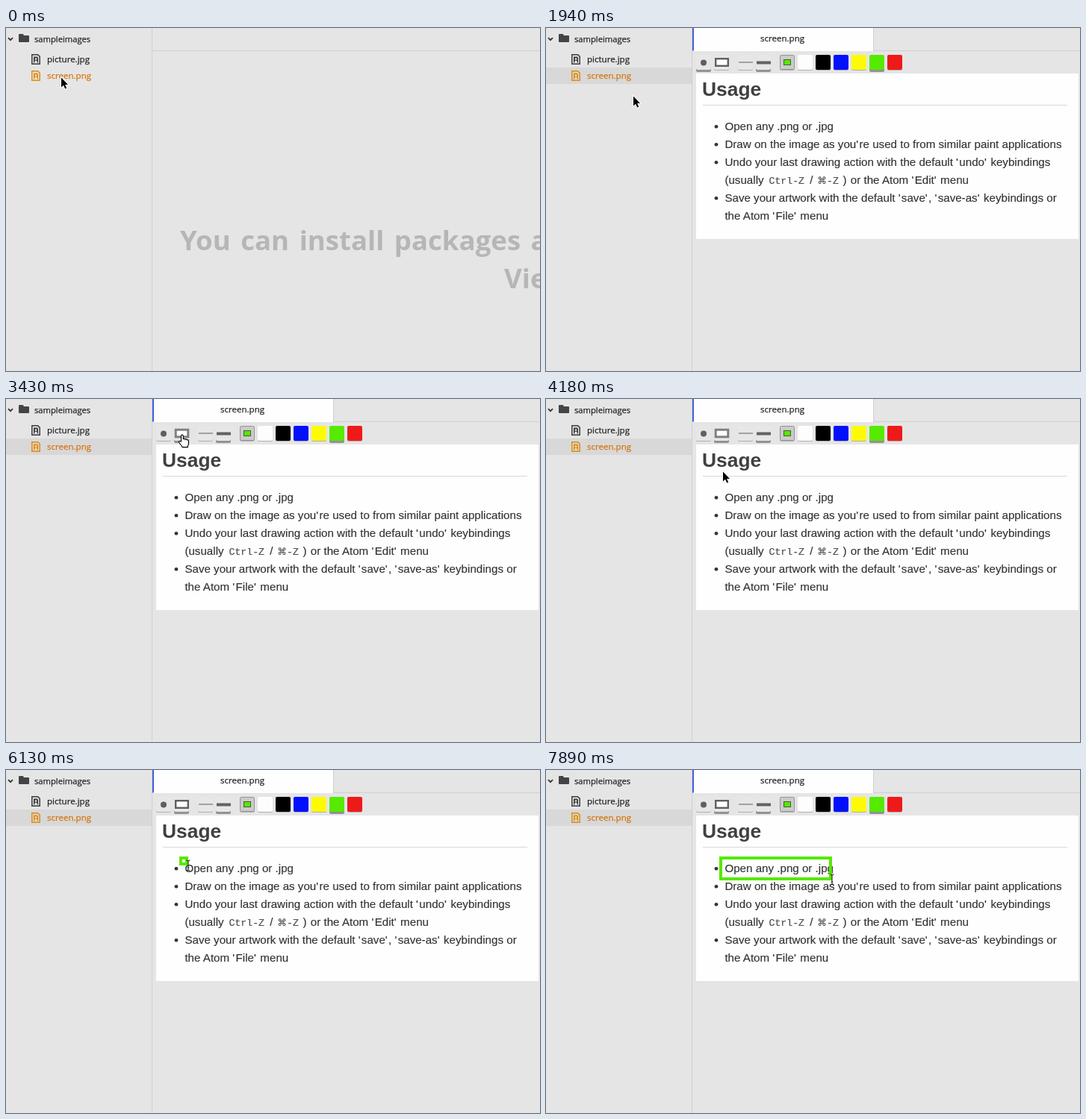
An HTML page for the animation above (8000 ms loop, 715x460 px).

```html
<!DOCTYPE html>
<html lang="en">
<head>
<meta charset="utf-8">
<title>Paint in the editor</title>
<style>
html, body { margin: 0; width: 100%; height: 100%; overflow: hidden; background: #e5e5e5; }
svg { display: block; width: 715px; height: 460px; overflow: hidden; }
text { white-space: pre; }
.ui { font: 11.55px "Open Sans", "Noto Sans", sans-serif; fill: #222; stroke: #222; stroke-width: .25; }
.ui.active { fill: #d5740c; stroke: #d5740c; }
.hint { font: bold 36.6px "Open Sans", "Noto Sans", sans-serif; fill: #b6b6b6; word-spacing: 4px; }
.body { font: 15.15px "Liberation Sans", Arial, sans-serif; fill: #333; stroke: #333; stroke-width: .15; }
.quote { letter-spacing: .085em; }
.head { font: bold 26.4px "Liberation Sans", Arial, sans-serif; fill: #404040; }
.code { font: 13.2px "Liberation Mono", "DejaVu Sans Mono", monospace; fill: #505050; stroke: #505050; stroke-width: .2; }
</style>
</head>
<body>
<svg viewBox="0 0 715 460">
  <defs>
    <g id="fileIcon">
      <path d="M.8 .8H8.6L11.2 3.4V13.2H.8Z" fill="none" stroke="currentColor" stroke-width="1.5"/>
      <path d="M3 3.4H7.6L9 4.8V11.4H7.6V9.6L6.9 8.8H5.1L4.4 9.6V11.4H3Z" fill="currentColor"/>
      <circle cx="6" cy="6.6" r="1.3" fill="#e5e5e5"/>
    </g>
  </defs>
  <rect width="715" height="460" fill="#e5e5e5"/>
  <rect id="row" y="53" width="195" height="22" fill="#d8d8d8"/>
  <path d="M195.5 0V460M196 30.5H715" stroke="#d0d0d0" fill="none"/>

  <path d="M3 13.2L6 16.2L9 13.2" fill="none" stroke="#333" stroke-width="1.8"/>
  <path d="M17 9q0-1 1-1h4.5q1 0 1 1v1H30q1 0 1 1v7q0 1-1 1H18q-1 0-1-1Z" fill="#444"/>
  <text class="ui" x="38" y="19" style="font-size:11.2px">sampleimages</text>
  <use href="#fileIcon" x="34" y="35" color="#3c3c3c"/>
  <text class="ui" x="55" y="46">picture.jpg</text>
  <use href="#fileIcon" x="34" y="57" color="#e08c0c"/>
  <text class="ui active" x="55" y="68">screen.png</text>

  <g id="welcome" class="hint">
    <text x="233" y="298">You can install packages a</text>
    <text x="667" y="349">Vie</text>
  </g>

  <g id="editor">
    <rect x="196" width="242" height="31" fill="#fefefe"/>
    <path d="M438.5 0V30" stroke="#d0d0d0"/>
    <rect id="tabBar" x="196" width="2" height="30.5"/>
    <text class="ui" x="287" y="18">screen.png</text>
    <g id="tools"></g>
    <rect x="201" y="61" width="512" height="222" fill="#fefefe"/>
    <text class="head" x="209" y="91">Usage</text>
    <path d="M210 103.5H698" stroke="#d9d9d9"/>
    <g id="list" class="body"></g>
    <rect id="box" fill="none" stroke="#56e800" stroke-width="4"/>
  </g>

  <g id="cursor">
    <path id="arrow" d="M1 1.5V14.5L4 11.7L6.2 16.6L8.2 15.7L6.1 10.9H10Z" fill="#000" stroke="#fff" stroke-width="1.8" paint-order="stroke"/>
    <path id="hand" d="M-1.5 9V1.5a1.4 1.4 0 0 1 2.8 0V6c.3-1 2.6-.9 2.7 .3c.5-.8 2.4-.6 2.5 .6c.7-.5 2 0 2 1.2v3.5c0 2-1.2 2.8-1.2 5H0c-.3-1.8-2.6-3.6-4.4-6.6c-.7-1.3 .8-2.4 1.9-1.3z" fill="#fff" stroke="#000" stroke-width="1.1"/>
    <path id="beam" d="M-2.5-7Q0-7 0-5.5Q0-7 2.5-7M0-5.5V5.5M-2.5 7Q0 7 0 5.5Q0 7 2.5 7M-1.3 3H1.3" fill="none" stroke="#111"/>
  </g>
</svg>
<script>
const $ = id => document.getElementById(id);
const NS = "http://www.w3.org/2000/svg";
const LOOP = 8000, OPEN = 750, PICK = 3430, DRAW = 5680;

function add(parent, tag, attrs, text) {
  const el = document.createElementNS(NS, tag);
  for (const k in attrs) el.setAttribute(k, attrs[k]);
  if (text) el.textContent = text;
  parent.append(el);
  return el;
}

// Toolbar buttons: a face and a shadow that is deeper when selected
function button(x, face, selected) {
  const shadow = add($("tools"), "rect", { x, width: 20, height: 20, rx: 2 });
  add($("tools"), "rect", { x, y: 36, width: 20, height: 20, rx: 2, fill: face });
  const select = on => {
    shadow.setAttribute("y", on ? 39 : 37);
    shadow.setAttribute("fill", on ? "#929292" : "#b0b0b0");
  };
  select(selected);
  return select;
}
const icon = (tag, attrs) => add($("tools"), tag, attrs);

const selectDot = button(201, "#e7e7e7", true);
icon("circle", { cx: 211, cy: 46.5, r: 4, fill: "#606060" });
const selectRect = button(225, "#e7e7e7", false);
const rectIcon = icon("rect", { x: 227.2, y: 41.2, width: 16.6, height: 9.6, fill: "#fff" });
button(257, "#e7e7e7", false);
icon("path", { d: "M258 46H277", stroke: "#858585", "stroke-width": 1.4 });
button(281, "#e7e7e7", true);
icon("path", { d: "M282 46.5H301", stroke: "#626262", "stroke-width": 4 });
button(313, "#cbcbcb", false);
icon("rect", { x: 313.5, y: 36.5, width: 19, height: 19, rx: 2, fill: "none", stroke: "#939393" });
icon("rect", { x: 318.5, y: 42.5, width: 9, height: 7, fill: "#56e800", stroke: "#4a5a40" });
["#fdfdfd", "#000", "#0010ff", "#fdfb02", "#56ea00", "#ee1a1a"].forEach((c, i) =>
  button(337 + 24 * i, c, i === 4));

// Document text, with slightly open straight quotes
const lines = [
  "Open any .png or .jpg",
  "Draw on the image as you're used to from similar paint applications",
  "Undo your last drawing action with the default 'undo' keybindings",
  "(usually",
  "Save your artwork with the default 'save', 'save-as' keybindings or",
  "the Atom 'File' menu"
];
const lineY = i => 137 + 24 * i;
function put(x, row, text, cls = "body") {
  const el = add($("list"), "text", { x, y: lineY(row), class: cls });
  for (const part of text.split(/(')/))
    add(el, "tspan", part === "'" ? { class: "quote" } : {}, part);
  return el;
}
lines.forEach((s, i) => put(239.4, i, s));
[0, 1, 2, 4].forEach(i => add($("list"), "circle", { cx: 228, cy: lineY(i) - 4.7, r: 2.3, fill: "#333" }));
put(298.5, 3, "Ctrl-Z", "code");
put(353.3, 3, "/");
put(363.5, 3, "\u2318", "code").style.font = "12.5px 'DejaVu Sans', sans-serif";
put(376, 3, "-Z", "code");
put(397.4, 3, ")");
put(407.8, 3, "or the Atom 'Edit' menu");

// Pointer: each run has a shape, a start time, a step length and its points
const runs = [
  ["arrow", 0, 0, [[73, 65]]],
  ["arrow", 1640, 148.5, [[80, 71], [95, 83], [116, 90], [142, 91], [169, 87], [196, 79], [216, 69], [226, 61]]],
  ["hand", 2830, 150, [[233, 52], [236, 47], [236, 48]]],
  ["hand", 3430, 150, [[236, 48], [236, 50], [238, 55]]],
  ["arrow", 3880, 150, [[239, 66], [238, 80], [236, 96], [235, 111], [235, 117], [234, 120]]],
  ["arrow", 5080, 300, [[233, 117], [232, 117]]],
  ["beam", 5680, 148.5, [[235, 120], [237, 122], [240, 125], [244, 128], [250, 131], [259, 135], [271, 138], [286, 142]]],
  ["beam", 6870, 145.7, [[305, 144], [322, 145], [337, 146], [350, 146], [361, 147], [371, 147], [379, 147], [383, 147]]]
];
const steps = runs.flatMap(([kind, start, gap, pts]) =>
  pts.map(([x, y], i) => ({ t: Math.floor(start + gap * i), kind, x, y })));

const show = (id, on) => $(id).setAttribute("visibility", on ? "inherit" : "hidden");
const mix = (a, b, k) => a + (b - a) * k;

function render(t) {
  const open = t >= OPEN;
  show("row", open);
  show("welcome", !open);
  $("editor").setAttribute("visibility", open ? "visible" : "hidden");

  const bar = $("tabBar");
  const early = t < 890;
  bar.setAttribute("y", early ? 7 : 0);
  bar.setAttribute("height", early ? 15 : 30.5);
  bar.setAttribute("fill", early ? "#e2e2e2" : t < 1040 ? "#a3b0e6" : "#4361dc");

  const picked = t >= PICK, focus = picked && t < DRAW;
  selectDot(!picked);
  selectRect(picked);
  rectIcon.setAttribute("stroke", focus ? "#808080" : "#606060");
  rectIcon.setAttribute("stroke-width", focus ? 3 : 2.4);

  let i = steps.length - 1;
  while (steps[i].t > t) i--;
  const now = steps[i], before = steps[Math.max(0, i - 1)];
  $("cursor").setAttribute("transform", `translate(${now.x} ${now.y})`);
  for (const kind of ["arrow", "hand", "beam"]) show(kind, kind === now.kind);

  // The dragged corner trails a little behind the pointer
  show("box", t >= DRAW);
  if (t >= DRAW) {
    $("box").setAttribute("x", 234);
    $("box").setAttribute("y", 118);
    $("box").setAttribute("width", Math.max(0, Math.round(mix(now.x, before.x, .27) - 1) - 234));
    $("box").setAttribute("height", Math.max(0, Math.round(mix(now.y, before.y, .27) - 1) - 118));
  }
}

const origin = performance.now();
function tick() {
  render((performance.now() - origin) % LOOP);
  requestAnimationFrame(tick);
}
tick();
</script>
</body>
</html>
```
